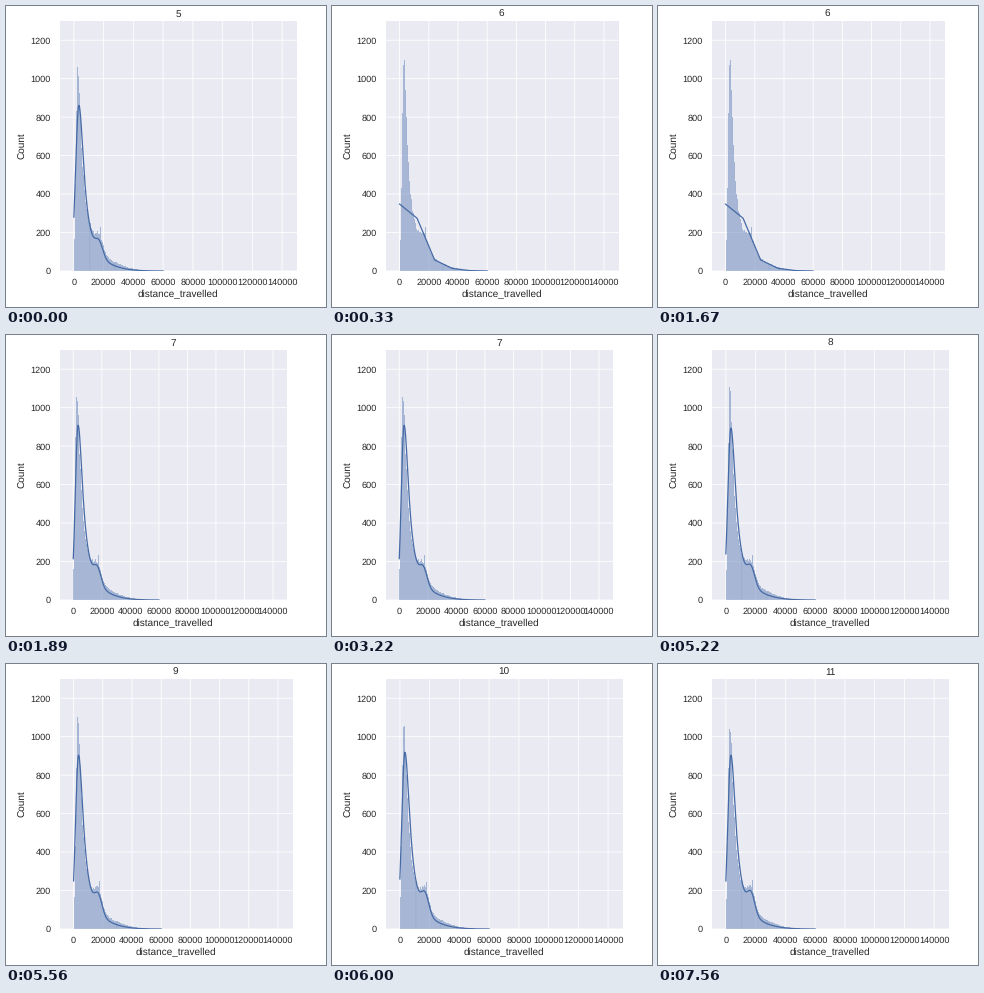
These frames come from a looping animation (320 px wide and 301 px high, 8000 ms). A matplotlib script:

```python
import numpy as np
import matplotlib.pyplot as plt
from matplotlib.animation import FuncAnimation
from matplotlib.collections import PolyCollection

W, H, DPI = 320, 301, 60
LEFT, TOP, BOTTOM = 53, 15, 265
STEP_MS, LOOP_MS = 40, 8000
BIN = 700
CURVE_MODE, BAR_MODE, SHOULDER_AT = 3400, 2600, 17000

plt.rcParams.update({
    "font.family": "Liberation Sans", "font.size": 12,
    "axes.labelsize": 12, "axes.titlesize": 12,
    "xtick.labelsize": 11, "ytick.labelsize": 11,
    "text.color": ".15", "axes.labelcolor": ".15",
    "xtick.color": ".15", "ytick.color": ".15",
    "text.hinting": "none",
})

# number: (start ms, right edge px, curve at zero, curve peak, sampling step)
STAGES = {
    5: (0, 291, 280, 862, 250),
    6: (330, 286.5, 348, 1210, 12000),
    7: (1890, 281.3, 215, 910, 250),
    8: (3560, 291, 240, 895, 250),
    9: (5330, 286.5, 250, 905, 250),
    10: (6000, 291, 260, 920, 250),
    11: (7560, 291, 250, 905, 250),
}


def skewed(x, mode, rise, fall, power):
    """Gaussian rise to 1 at the mode, then a long tail that fades out."""
    d = x - mode
    tail = (1 + (d / fall) ** 2) ** -power * np.exp(-(x / 36000) ** 3)
    return np.where(d < 0, np.exp(-(d / rise) ** 2 / 2), tail)


def shoulder(x, number):
    return (45 + 5 * number) * np.exp(-((x - SHOULDER_AT) / 2500) ** 2 / 2)


def curve_points(number):
    _, _, at_zero, peak, step = STAGES[number]
    x = np.arange(0, 60001, step)
    rise = CURVE_MODE / np.sqrt(2 * np.log(peak / at_zero))
    return x, peak * skewed(x, CURVE_MODE, rise, 3700, .8) + shoulder(x, number)


def bar_polygons(number):
    rng = np.random.default_rng(number)
    lefts = np.arange(90) * BIN
    mid = lefts + BIN / 2
    heights = 1090 * skewed(mid, BAR_MODE, 1150, 2200, .55) + shoulder(mid, number)
    heights *= rng.uniform(.96, 1.04, lefts.size)
    heights[17600 // BIN] += 45
    return [[(x, 0), (x, h), (x + BIN, h), (x + BIN, 0)]
            for x, h in zip(lefts, heights)]


fig = plt.figure(figsize=(W / DPI, H / DPI), dpi=DPI, facecolor="white")
ax = fig.add_axes([0, 0, 1, 1], facecolor="#EAEAF2")
ax.set(xlim=(-10000, 150000), ylim=(0, 1300),
       xticks=range(0, 140001, 20000), yticks=range(0, 1201, 200))
ax.set_axisbelow(True)
ax.grid(color="white", lw=1)
for line in ax.get_xgridlines() + ax.get_ygridlines():
    line.set_snap(False)
ax.tick_params(axis="x", length=0, pad=8.9)
ax.tick_params(axis="y", length=0, pad=9.5)
ax.set_xlabel("distance_travelled", labelpad=3.3)
ax.set_ylabel("Count", labelpad=4)
ax.spines[["top", "right"]].set_visible(False)
ax.spines[["left", "bottom"]].set(color="white", linewidth=1.25)

bars = ax.add_collection(PolyCollection([], facecolor="#4C72B0", edgecolor="white",
                                        lw=.2, alpha=.5), autolim=False)
curve, = ax.plot([], [], color="#466AA5", lw=1.5)
title = ax.set_title("", pad=5.2)

polygons = {n: bar_polygons(n) for n in STAGES}
curves = {n: curve_points(n) for n in STAGES}


def update(frame):
    now = frame * STEP_MS + 10
    number = max(n for n, stage in STAGES.items() if stage[0] <= now)
    right = STAGES[number][1]
    ax.set_position([LEFT / W, 1 - BOTTOM / H, (right - LEFT) / W, (BOTTOM - TOP) / H])
    bars.set_verts(polygons[number])
    curve.set_data(*curves[number])
    title.set_text(str(number))
    return bars, curve, title


anim = FuncAnimation(fig, update, frames=LOOP_MS // STEP_MS, interval=STEP_MS,
                     repeat=True, repeat_delay=0)
plt.show()
```
